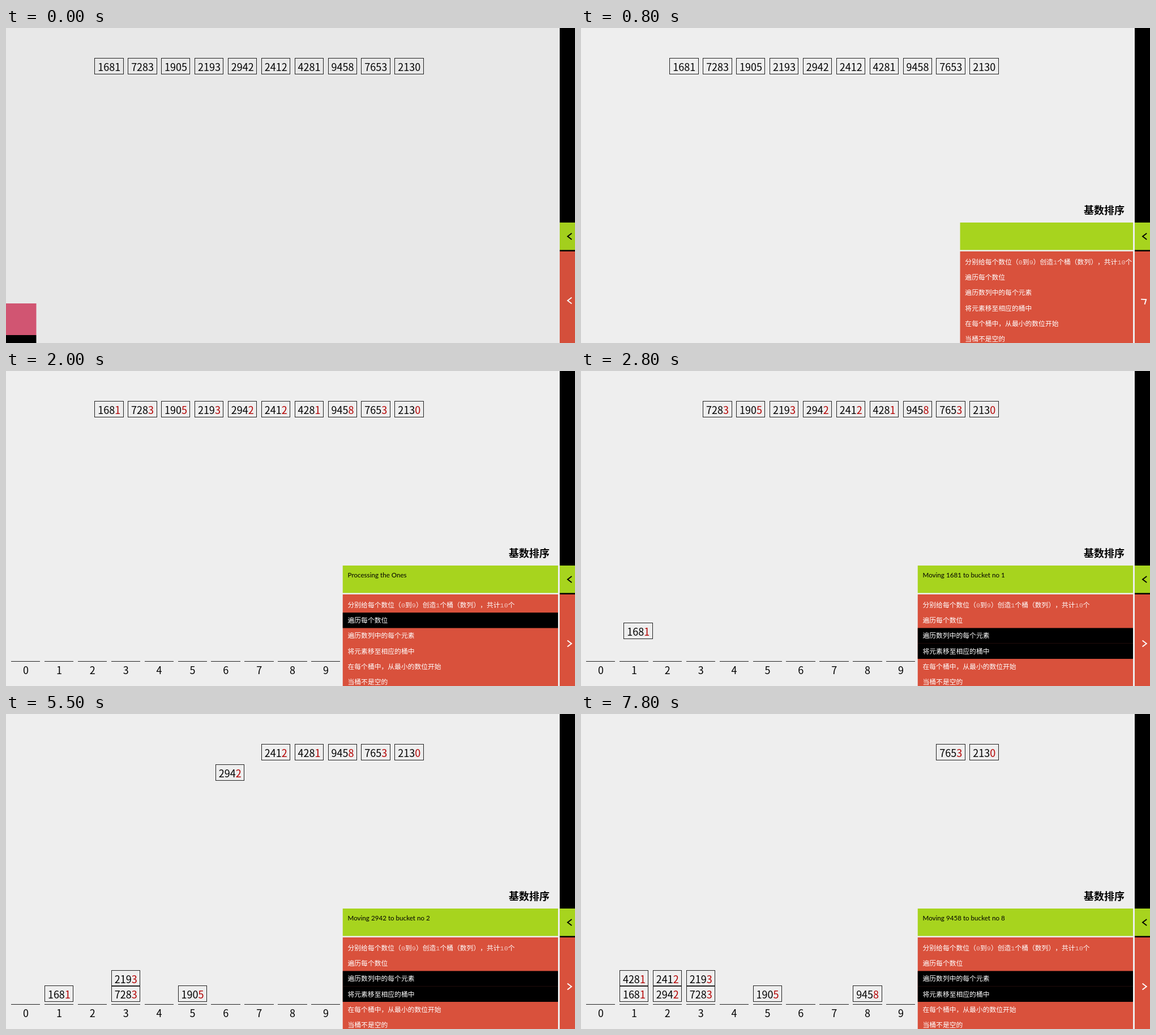
Recreate the animation shown at these times as an HTML page. Size 1005 by 557 pixels, loop 8 s.

```html
<!DOCTYPE html>
<html lang="zh">
<head>
<meta charset="utf-8">
<title>基数排序</title>
<style>
  html, body { margin: 0; width: 100%; height: 100%; overflow: hidden; background: #eee; }
  #stage { display: block; }
  text { white-space: pre; }
  .num { font: 18px "Noto Sans CJK SC", "Noto Sans CJK", sans-serif; text-anchor: middle; }
  .title { font: bold 18px "Noto Sans CJK SC", "Noto Sans CJK", sans-serif; text-anchor: end; }
  .status { font: 11.65px Lato, sans-serif; }
  .code {
    font: 11.8px "Liberation Mono", "Noto Sans CJK SC", "Noto Sans CJK", monospace;
    font-kerning: none;
    text-spacing-trim: space-all;
    fill: #fff;
  }
  .digit { fill-opacity: .65; }
  .box { fill: none; stroke: #222; }
  .chevron { fill: none; stroke-width: 1.9; }
</style>
</head>
<body>
<svg id="stage" width="1005" height="557" viewBox="0 0 1005 557"></svg>
<script>
const LOOP = 8000, TICK = 100;
const GREEN = '#a7d41e', RED = '#d9513c', PINK = '#d65775', MARK = '#b40000';
const PITCH = 58.89, LEFT = 9.1, WIDTH = 51.35, TOP = 53, FLOOR = 480.2, ROW = 27.22;
const UNDIM = 100, OPEN = 517, OPEN_TIME = 400, PASS = 2000;
const MOVE = 2626, MOVE_EVERY = 702, MOVE_TIME = 240, MOVES = 8;
const numbers = [1681, 7283, 1905, 2193, 2942, 2412, 4281, 9458, 7653, 2130].map(String);
const steps = [
  '分别给每个数位（0到9）创造1个桶（数列），共计10个',
  '遍历每个数位',
  '遍历数列中的每个元素',
  '将元素移至相应的桶中',
  '在每个桶中，从最小的数位开始',
  '当桶不是空的',
];

const clamp = p => Math.min(1, Math.max(0, p));
const swing = p => (1 - Math.cos(Math.PI * p)) / 2;
const cubic = p => p < .5 ? 4 * p ** 3 : 1 - 4 * (1 - p) ** 3;
const mix = (a, b, p) => a + (b - a) * p;
const columnX = column => LEFT + PITCH * column;
const moveStart = i => MOVE + MOVE_EVERY * i;

// Both edges snap to whole pixels, so widths vary by one.
const snap = x => {
  const left = Math.round(x);
  return { left, width: Math.round(x + WIDTH) - left };
};

const rect = (x, y, w, h, fill) => `<rect x="${x}" y="${y}" width="${w}" height="${h}" fill="${fill}"/>`;
const text = (style, x, y, content) => `<text class="${style}" x="${x}" y="${y}">${content}</text>`;
const chevron = (y, color, turn) =>
  `<path class="chevron" stroke="${color}" transform="translate(995.4 ${y}) rotate(${turn})" d="M3.8 -5.6L-3.4 0L3.8 5.6"/>`;

// Each number lands on top of earlier ones with the same last digit.
const items = numbers.map((value, i) => {
  const digit = value[3];
  const below = numbers.slice(0, i).filter(other => other[3] === digit).length;
  return { value, digit, fromX: columnX(i + 2.5), toX: columnX(+digit), toY: FLOOR - ROW * below };
});

function drawItem({ value, digit, fromX, toX, toY }, i, t) {
  const p = i < MOVES ? cubic(clamp((t - moveStart(i)) / MOVE_TIME)) : 0;
  const x = mix(fromX, toX, p), y = Math.round(mix(TOP, toY, p));
  const { left, width } = snap(x);
  const last = t < PASS ? digit : `<tspan fill="${MARK}">${digit}</tspan>`;
  return `<rect class="box" x="${left + .5}" y="${y + .5}" width="${width - 1}" height="28"/>` +
    text('num', x + 25.9, y + 23, value.slice(0, 3) + last);
}

function drawBuckets() {
  return numbers.map((_, i) => {
    const { left, width } = snap(columnX(i));
    return rect(left, 513, width, 1, '#222') + text('num', columnX(i) + 25.9, 536, i);
  }).join('');
}

function drawPanel(t, open) {
  const width = 380.5 * open;
  const active = Math.floor((t - MOVE) / MOVE_EVERY);
  let status = '', marked = [];
  if (active >= 0) {
    const { value, digit } = items[Math.min(active, MOVES - 1)];
    status = `Moving ${value} to bucket no ${digit}`;
    marked = [2, 3];
  } else if (t >= PASS) {
    status = 'Processing the Ones';
    marked = [1];
  }
  const lines = steps.map((step, i) =>
    (marked.includes(i) ? rect(0, 56 + ROW * i, 381, ROW + .1, '#000') : '') +
    text('code', 9, 73.9 + ROW * i, step.replace(/\d+/g, '<tspan class="digit">$&</tspan>')));
  return text('title', 960, 329, '基数排序') +
    `<svg x="${975 - width}" y="344" width="${width}" height="213">` +
    rect(0, 0, 381, 48.5, GREEN) + rect(0, 51, 381, 162, RED) +
    text('status', 9, 21.4, status) + lines.join('') + '</svg>';
}

function draw(t) {
  const open = swing(clamp((t - OPEN) / OPEN_TIME));
  return rect(0, 0, 1005, 557, '#eee') +
    items.map((item, i) => drawItem(item, i, t)).join('') +
    (t >= PASS ? drawBuckets() : '') +
    (open ? drawPanel(t, open) : rect(0, 487, 53.5, 56, PINK) + rect(0, 543, 53.5, 14, '#000')) +
    rect(978, 0, 27, 557, '#000') + rect(978, 344, 27, 48.5, GREEN) + rect(978, 395, 27, 162, RED) +
    chevron(368.5, '#000', 0) + chevron(482, '#fff', 180 * open) +
    (t < UNDIM ? rect(0, 0, 1005, 557, 'rgba(0,0,0,.025)') : '');
}

const stage = document.getElementById('stage');
const begin = performance.now();
let shown = -1;
function frame() {
  const t = Math.floor((performance.now() - begin) % LOOP / TICK) * TICK;
  if (t !== shown) stage.innerHTML = draw(shown = t);
  requestAnimationFrame(frame);
}
frame();
</script>
</body>
</html>
```
